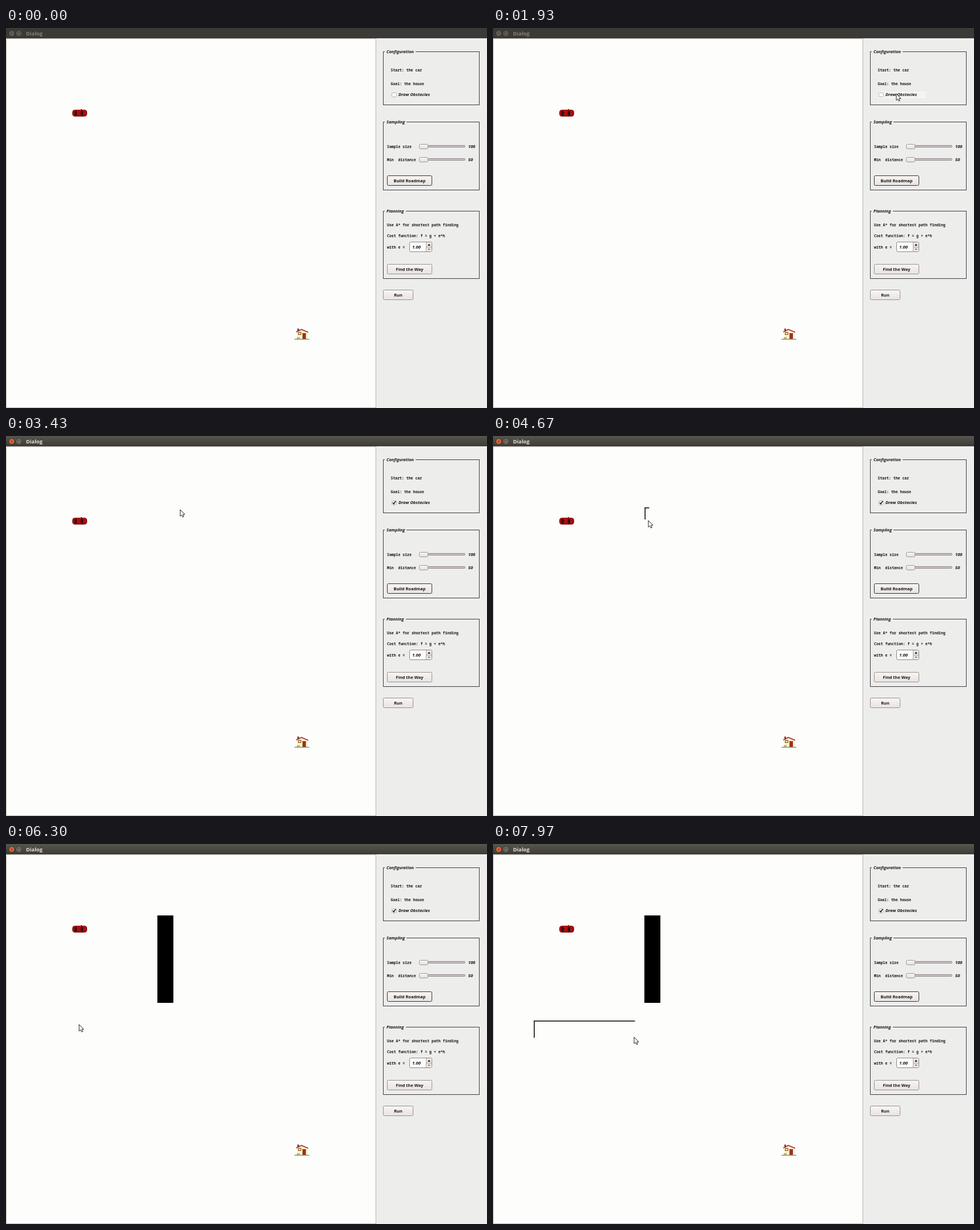
These frames come from a looping animation (842 px wide and 665 px high, 8 s). An HTML page with a canvas:

```html
<!DOCTYPE html>
<html lang="en">
<head>
<meta charset="utf-8">
<title>Dialog</title>
<style>
html, body { margin: 0; width: 100%; height: 100%; overflow: hidden; background: #ededec; }
canvas { display: block; }
</style>
</head>
<body>
<canvas id="stage" width="842" height="665"></canvas>
<script>
const ctx = document.getElementById('stage').getContext('2d');
const LOOP = 8000;
const CLICK = 2470;
const PANEL = '#ededec';
const INK = '#161616';
const SANS = '"Open Sans", "Noto Sans", sans-serif';
const MONO = '"Noto Sans Mono", "DejaVu Sans Mono", monospace';

const spot = (x, y) => ({ x, y });
const easeOut = power => k => 1 - (1 - k) ** power;
const smooth = k => k * k * (3 - 2 * k);

const outside = spot(850, 30), check = spot(706, 115);
const wallStart = spot(265, 125), wallEnd = spot(291, 277);
const shelfStart = spot(71, 309), shelfEnd = spot(247, 338);

// A glide eases from one spot to the next; bend bows its path sideways.
const glide = (start, stop, from, to, ease, bend = spot(0, 0)) => ({ start, stop, from, to, ease, bend });
const drawWall = glide(4560, 5780, wallStart, wallEnd, easeOut(1.7), spot(6, 0));
const drawShelf = glide(7000, LOOP, shelfStart, shelfEnd, smooth);
const glides = [
  glide(300, 1900, outside, check, easeOut(2)),
  glide(2600, 4270, check, wallStart, easeOut(3.5), spot(0, 16)),
  drawWall,
  glide(5780, 6800, wallEnd, shelfStart, easeOut(1.9), spot(0, 20)),
  drawShelf
];

function along({ start, stop, from, to, ease, bend }, t) {
  const k = ease(Math.min(1, Math.max(0, (t - start) / (stop - start))));
  const bow = 4 * k * (1 - k);
  return spot(
    Math.round(from.x + (to.x - from.x) * k + bend.x * bow),
    Math.round(from.y + (to.y - from.y) * k + bend.y * bow)
  );
}

function rect(x, y, w, h, color) {
  ctx.fillStyle = color;
  ctx.fillRect(x, y, w, h);
}

function poly(points, fill, stroke, width = 1) {
  ctx.beginPath();
  points.forEach(([x, y], i) => i ? ctx.lineTo(x, y) : ctx.moveTo(x, y));
  if (fill) {
    ctx.closePath();
    ctx.fillStyle = fill;
    ctx.fill();
  }
  if (stroke) outline(stroke, width);
}

function outline(color, width = 1) {
  ctx.strokeStyle = color;
  ctx.lineWidth = width;
  ctx.stroke();
}

function disc(x, y, r, fill, edge) {
  ctx.beginPath();
  ctx.arc(x, y, r, 0, Math.PI * 2);
  ctx.fillStyle = fill;
  ctx.fill();
  outline(edge, 0.8);
}

function box(x, y, w, h, r, fill, edge) {
  ctx.beginPath();
  ctx.roundRect(x + 0.5, y + 0.5, w - 1, h - 1, r);
  ctx.fillStyle = fill;
  ctx.fill();
  outline(edge);
}

function shade(y, h, top, bottom) {
  const g = ctx.createLinearGradient(0, y, 0, y + h);
  g.addColorStop(0, top);
  g.addColorStop(1, bottom);
  return g;
}

function text(str, x, y, font, color = INK, align = 'left') {
  ctx.font = font;
  ctx.fillStyle = color;
  ctx.textAlign = align;
  ctx.fillText(str, x, y);
}
const label = (str, x, y) => text(str, x, y, `bold 6.5px ${MONO}`);
const slanted = (str, x, y, size = 7.4) => text(str, x, y, `italic bold ${size}px ${SANS}`);

function titleBar(active) {
  rect(0, 0, 842, 18, active ? shade(0, 18, '#57564c', '#3c3b37') : '#3b3a36');
  const edge = '#34332f';
  const mark = active ? '#6d2a16' : '#3b3a36';
  disc(10, 9.5, 4.8, active ? '#ec6640' : '#66645d', edge);
  poly([[8, 7.5], [12, 11.5]], null, mark);
  poly([[12, 7.5], [8, 11.5]], null, mark);
  disc(22.5, 9.5, 4.8, active ? '#7f7d73' : '#66645d', edge);
  ctx.strokeStyle = '#3b3a36';
  ctx.strokeRect(20.5, 7.5, 4, 4);
  text('Dialog', 35, 13, `bold 9.2px ${SANS}`, active ? '#e4e0d8' : '#85827b');
}

function group(title, y, h, gapEnd) {
  ctx.strokeStyle = '#3c3c42';
  ctx.lineWidth = 1;
  ctx.strokeRect(660.5, y + 0.5, 168, h);
  rect(663, y, gapEnd - 663, 1, PANEL);
  slanted(title, 666, y + 3);
}

function button(str, x, y, w, edge) {
  const h = 18;
  box(x, y, w, h, 2, shade(y, h, '#f8f5f3', '#e8e3df'), edge);
  text(str, x + w / 2, y + h / 2 + 2.7, `bold 7.4px ${SANS}`, INK, 'center');
}

function slider(name, y, value) {
  label(name, 667, y + 2.5);
  box(731, y - 2, 73, 4, 1, '#cfc3cb', '#8d8289');
  box(723, y - 4, 16, 9, 2, shade(y - 4, 9, '#faf8f7', '#e2ddda'), '#a09890');
  slanted(value, 809, y + 2.7, 7.6);
}

function spinBox(x, y) {
  box(x, y, 40, 18, 2, '#fff', '#8f867f');
  rect(x + 30, y + 1, 9, 16, '#ece8e5');
  rect(x + 29, y + 1, 1, 16, '#aaa19a');
  rect(x + 30, y + 9, 9, 1, '#aaa19a');
  const arrow = (base, rise, color) =>
    poly([[x + 32, base], [x + 37, base], [x + 34.5, base + rise]], color);
  arrow(y + 7, -3.5, '#222');
  arrow(y + 12, 3, '#8a837d');
  slanted('1.00', x + 5, y + 12, 7.8);
}

function panel(checked, hover) {
  group('Configuration', 41, 93, 717);
  label('Start: the car', 673.5, 76);
  label('Goal: the house', 673.5, 99.5);
  if (hover) rect(674, 111, 84, 12, '#f5f4f3');
  box(675, 113, 9, 8, 1, '#fff', '#b5aea8');
  if (checked) poly([[677, 116.5], [678.8, 119], [682.2, 114]], null, INK, 1.5);
  slanted('Draw Obstacles', 687, 119.2, 7.5);

  group('Sampling', 164, 119, 701);
  slider('Sample size', 207, '100');
  slider('Min\u00a0 distance', 230, '50');
  button('Build Roadmap', 667, 258, 79, '#35302e');

  group('Planning', 320, 118, 700);
  label('Use A* for shortest path finding', 667, 346.5);
  label('Cost function: f = g + e*h', 667, 366);
  label('with e =', 667, 385.5);
  spinBox(706, 374);
  button('Find the Way', 667, 413, 79, '#98908a');
  button('Run', 660, 458, 53, '#98908a');
}

function car() {
  box(116, 143, 26, 12, 4, '#a80e0e', '#7c0a0a');
  rect(120, 144, 17, 1, '#c4211c');
  for (const x of [120, 131]) rect(x, 145, 4, 8, '#33100f');
  for (const y of [142, 154]) rect(131, y, 2, 1, '#5c0b0b');
}

function house() {
  rect(510, 526, 3, 5, '#6a4862');
  poly([[510, 533], [517, 528], [528, 533], [528, 544], [510, 544]], '#f8efd2');
  poly([[508, 532], [517, 527.5], [529, 532.5]], null, '#b02822', 1.6);
  rect(511, 532, 6, 5, '#8b5a24');
  rect(512, 533, 4, 3, '#f0d25c');
  rect(519, 534, 6, 10, '#9c3420');
  rect(509, 541, 5, 3, '#cfb083');
  rect(505, 544, 26, 1.3, '#56a047');
}

// While it is dragged out, only the top and left edges show.
function obstacle(drag, t) {
  if (t < drag.start) return;
  const { x, y } = drag.from;
  const end = along(drag, t - 15);
  const w = end.x + 2 - x, h = end.y + 1 - y;
  if (t >= drag.stop) return rect(x, y, w, h, '#000');
  rect(x + 0.5, y, w, 1.5, '#000');
  rect(x + 0.5, y, 1.5, h, '#000');
}

function pointer({ x, y }) {
  poly([
    [x, y], [x, y + 11.5], [x + 2.6, y + 9.2], [x + 4.4, y + 13],
    [x + 6.3, y + 12.1], [x + 4.6, y + 8.4], [x + 8, y + 8.2], [x, y], [x, y + 1]
  ], '#fff', '#222');
}

function draw(t) {
  const clicked = t >= CLICK;
  rect(0, 0, 842, 665, PANEL);
  rect(0, 18, 648, 647, '#bdb3ab');
  rect(1, 19, 646, 645, '#fdfdfc');
  titleBar(clicked);
  panel(clicked, t >= 1500 && t < 2700);
  car();
  house();
  obstacle(drawWall, t);
  obstacle(drawShelf, t);
  const current = glides.findLast(g => t >= g.start);
  if (current) pointer(along(current, t));
}

const start = performance.now();
function tick() {
  draw((performance.now() - start) % LOOP);
  requestAnimationFrame(tick);
}
tick();
</script>
</body>
</html>
```
